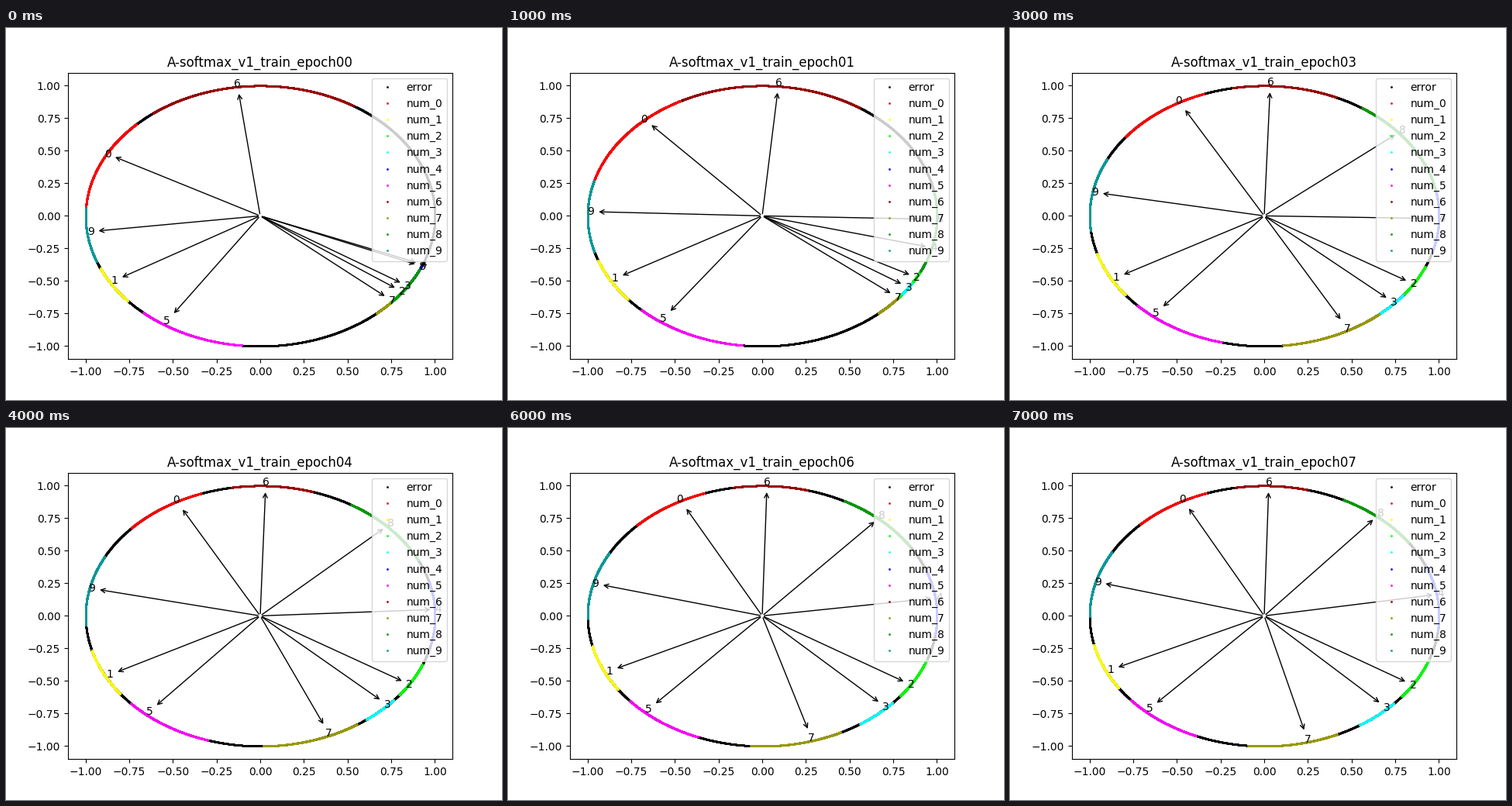
A matplotlib script for the animation above (8000 ms loop, 640 px wide and 480 px high).

```python
import numpy as np
import matplotlib.pyplot as plt
from matplotlib.animation import FuncAnimation

EPOCHS = 8
COLORS = ["#ff0000", "#ffff00", "#00ff00", "#00ffff", "#0000ff",
          "#ff00ff", "#990000", "#999900", "#009900", "#009999"]

# Weight direction of each digit, in degrees, at a few key epochs.
KEY_EPOCHS = np.array([0, 1, 3, 7])
KEY_HEADINGS = [
    (153.2, 134.0, 120.7, 119.2),
    (211.4, 210.4, 209.9, 206.0),
    (-37.4, -29.9, -33.2, -33.7),
    (-34.3, -35.0, -43.7, -47.0),
    (-23.5, -15.7, -2.6, 8.3),
    (236.4, 234.2, 230.3, 227.5),
    (98.7, 85.7, 89.1, 89.6),
    (-42.6, -40.7, -62.8, -76.8),
    (-24.4, -2.9, 39.4, 49.8),
    (188.3, 179.5, 171.0, 166.4),
]
WARM_UP = -0.7   # where the first epoch's visible training begins
CROWDING = 3.3   # a side may exceed the tighter side by this factor


def settle(epoch):
    """Training slows down with time."""
    return 1 - np.exp(-epoch / 3.2)


def headings(epoch):
    if epoch < 0:  # extend the path backwards by point reflection
        return 2 * headings(0) - headings(-epoch)
    return np.array([np.interp(settle(epoch), settle(KEY_EPOCHS), row)
                     for row in KEY_HEADINGS])


def regions(epoch):
    """Angles closer to a digit than half the angle to its neighbour."""
    center = headings(epoch)
    order = np.argsort(center % 360)
    ring = center[order]
    above = (np.roll(ring, -1) - ring) % 360 / 3
    below = np.roll(above, 1)
    limit = CROWDING * np.minimum(above, below)
    start, end = np.empty_like(center), np.empty_like(center)
    start[order] = ring - np.minimum(below, limit)
    end[order] = ring + np.minimum(above, limit)
    return start, end


def swept_arcs(epoch):
    """Regions covered while the weights move through one epoch."""
    old_start, old_end = regions(max(epoch - 1, WARM_UP))
    start, end = regions(epoch)
    return np.minimum(start, old_start), np.maximum(end, old_end)


def unit(degrees):
    angle = np.radians(degrees)
    return np.cos(angle), np.sin(angle)


def plot_arc(start, end, color, label):
    angles = np.arange(start, end, 0.1)
    ax.plot(*unit(angles), ".", color=color, markersize=2, label=label)


def draw(epoch):
    ax.clear()
    ax.set(xlim=(-1.1, 1.1), ylim=(-1.1, 1.1),
           title=f"A-softmax_v1_train_epoch{epoch:02d}")

    plot_arc(0, 360, "black", "error")
    for digit, (start, end) in enumerate(zip(*swept_arcs(epoch))):
        plot_arc(start, end, COLORS[digit], f"num_{digit}")

    for digit, heading in enumerate(headings(epoch)):
        ax.annotate(str(digit), xy=(0, 0), xytext=unit(heading),
                    arrowprops=dict(arrowstyle="<-"))
    ax.legend(loc="upper right")


fig, ax = plt.subplots(figsize=(6.4, 4.8), dpi=100)
anim = FuncAnimation(fig, draw, frames=EPOCHS, interval=1000,
                     init_func=lambda: None, repeat=True, repeat_delay=0)
plt.show()
```
